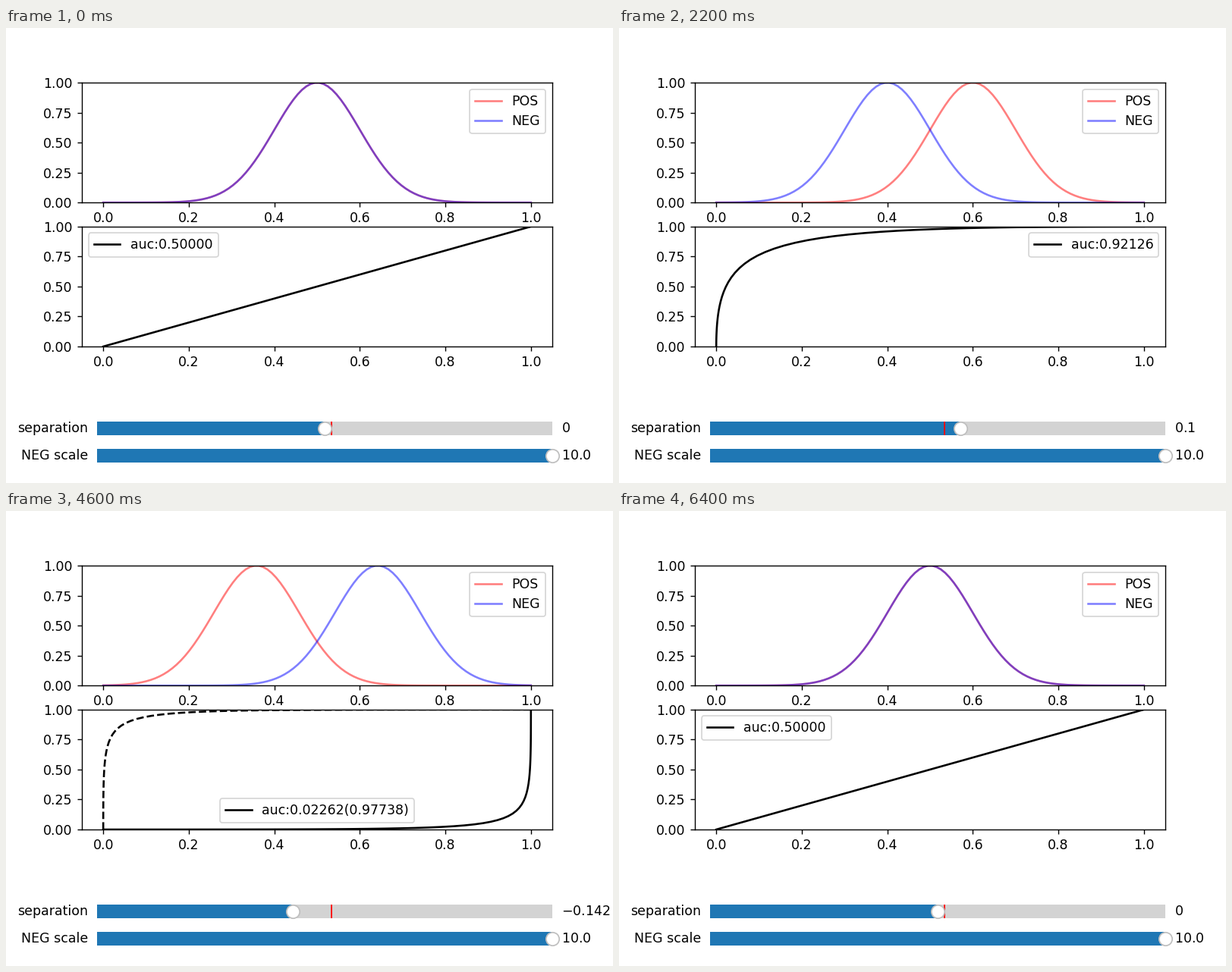
Write a matplotlib script that moves like this. It is 800 by 600 pixels and loops after 6600 ms.

```python
import math

import numpy as np
import matplotlib.pyplot as plt
from matplotlib.animation import FuncAnimation
from matplotlib.widgets import Slider

FRAMES = 33
INTERVAL = 200
QUARTER = 8          # frames from the centre to the widest separation
PEAK = 58            # widest separation, in slider drag steps
STEPS = 360          # drag steps per unit of separation
SIGMA = 0.1

x = np.linspace(0, 1, 100)


def separation(i):
    """Triangle wave, snapped down to whole drag steps."""
    phase = (i / QUARTER) % 4
    wave = 1 - abs(phase - 1) if phase <= 3 else phase - 4
    return math.floor(PEAK * wave) / STEPS


def bell(mean):
    return np.exp(-0.5 * ((x - mean) / SIGMA) ** 2)


def rate(pdf):
    """Share of the distribution above each falling threshold."""
    total = np.cumsum(pdf[::-1])
    return np.concatenate([[0], total / total[-1]])


def area(u, v):
    return np.sum(np.diff(u) * (v[1:] + v[:-1]) / 2)


fig, (top, roc) = plt.subplots(2, 1, figsize=(6.4, 4.8), dpi=125)
fig.subplots_adjust(bottom=0.3)

pos_line, = top.plot(x, bell(0.5), color="red", alpha=0.5, label="POS")
neg_line, = top.plot(x, bell(0.5), color="blue", alpha=0.5, label="NEG")
top.set_ylim(0, 1)
top.legend(loc="upper right")

sep_slider = Slider(fig.add_axes([0.15, 0.09, 0.75, 0.06]),
                    "separation", -1, 1, valinit=0.03)
scale_slider = Slider(fig.add_axes([0.15, 0.03, 0.75, 0.06]),
                      "NEG scale", 0.1, 10, valinit=10)
scale_slider.vline.set_visible(False)
sep_slider.drawon = False


def draw(i):
    sep = separation(i)
    pos, neg = bell(0.5 + sep), bell(0.5 - sep)
    pos_line.set_ydata(pos)
    neg_line.set_ydata(neg)

    tpr, fpr = rate(pos), rate(neg)
    auc = area(fpr, tpr)
    label = f"auc:{auc:.5f}"
    if sep < 0:
        label += f"({1 - auc:.5f})"

    roc.clear()
    roc.plot(fpr, tpr, color="black", label=label)
    if sep < 0:
        roc.plot(tpr, fpr, color="black", linestyle="--")
    roc.set_ylim(0, 1)
    roc.legend(loc="best")

    sep_slider.set_val(sep)
    return []


anim = FuncAnimation(fig, draw, frames=FRAMES, interval=INTERVAL, repeat=True)
plt.show()
```
